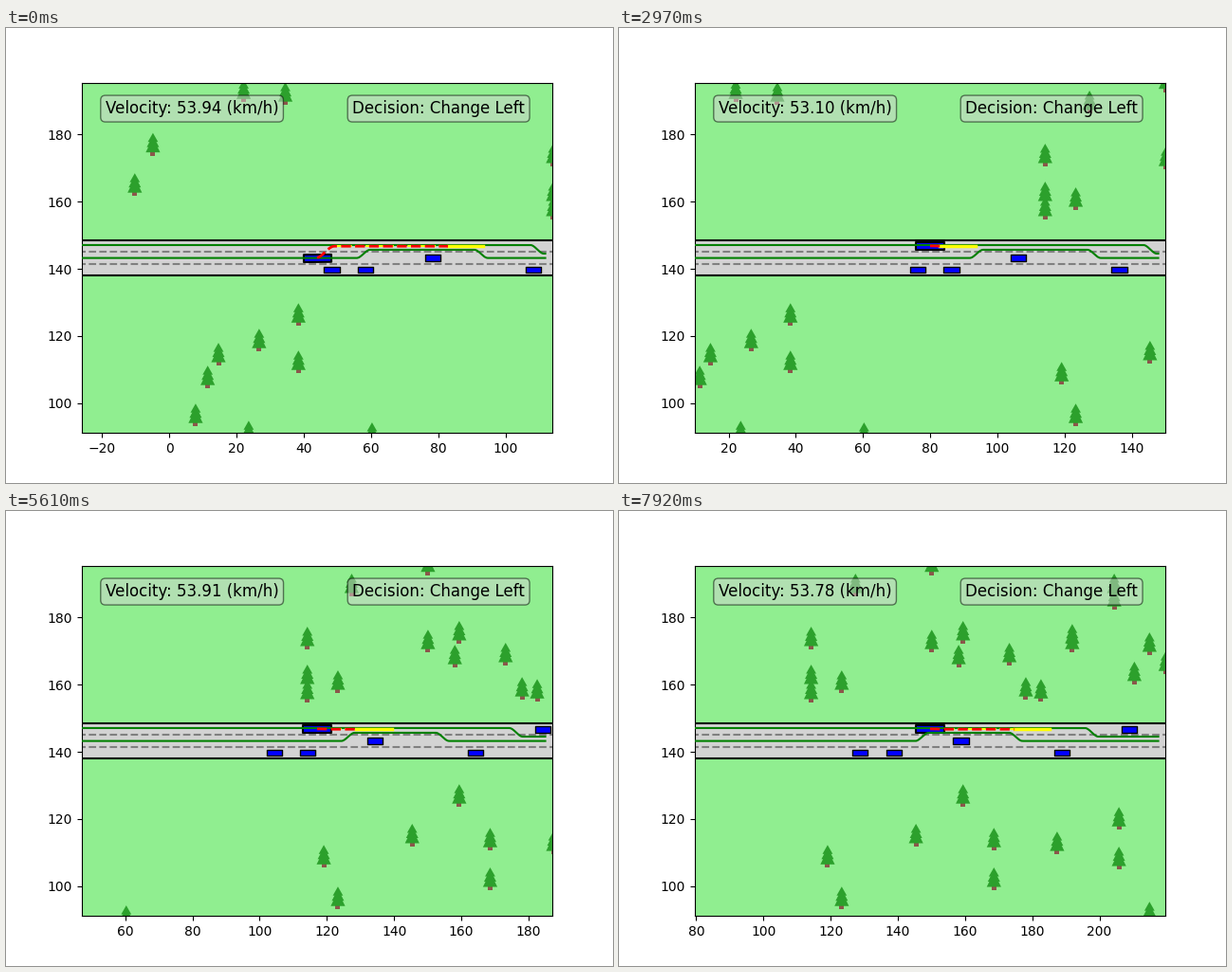
A matplotlib script for the animation above (8000 ms loop, 640 px wide and 480 px high).

```python
import numpy as np
import matplotlib.pyplot as plt
from matplotlib.animation import FuncAnimation
from matplotlib.collections import PolyCollection

TICK, LOOP, STEP_MS = 40, 8000, 330
LAST_STEP = LOOP // STEP_MS
SPAN = 140
BOTTOM = 91.15
TOP = BOTTOM + SPAN * 369.6 / 496
PX = SPAN / 496  # metres per pixel

LANE, CURB = 3.5, 138
RIGHT, MIDDLE, LEFT = (CURB + LANE * (n + 0.5) for n in range(3))

EGO_SPEED, CAR_SPEED = 4.643, 3.5  # metres per step
CARS = [(0, RIGHT), (10, RIGHT), (30, MIDDLE), (60, RIGHT), (80, LEFT)]
PLAN_STEPS, PLAN_LENGTH = 10, 45.9

# Reading on the speed label, as (step, km/h)
SPEED_KEYS = [(1, 53.94), (4, 50.49), (7, 52.90), (12, 53.40),
              (15, 53.76), (19, 54.07), (24, 53.78)]

# Per plan: where the lower guide rises and falls, where the upper one drops
GUIDES = [(83.8, 118.8, 135.5), (79.2, 107.3, 129.2), (67.6, 95.5, 118.1)]

# Trees by column: x, then the heights at which they stand
TREES = {
    -10.3: [165.1], -4.9: [177.1], 7.8: [96.5], 11.4: [107.8],
    14.6: [114.6], 22.1: [193], 23.6: [91.4], 26.7: [118.8], 34.5: [192.2],
    38.4: [126.4, 112.3], 60.3: [90.9], 114.2: [173.9, 162.6, 158.1],
    119.1: [108.9], 123.3: [160.9, 96.5], 127.4: [189.7], 145.4: [115.2],
    150.1: [196, 173], 158.1: [168.5], 159.4: [175.6, 127],
    168.6: [114, 102.2], 173.2: [169.1], 178.1: [158.9], 182.6: [158.3],
    187.4: [112.9], 191.9: [174.7, 173], 204.4: [189.7, 185.7],
    205.8: [120.2, 108.4], 210.4: [163.5], 214.9: [172.2, 92],
    219.7: [166.5],
}


def smooth(u):
    u = np.clip(u, 0, 1)
    return u * u * (3 - 2 * u)


def ramp(x, mid, width=4):
    return smooth((x - mid) / width + 0.5)


def box(x, y, length, width, tilt=0):
    a = np.radians(tilt)
    turn = np.array([(np.cos(a), np.sin(a)), (-np.sin(a), np.cos(a))])
    corners = np.array([(-1, -1), (1, -1), (1, 1), (-1, 1)]) / 2
    return corners * (length, width) @ turn + (x, y)


def crown(x, y):
    """Three stacked triangles, each wider and lower than the last."""
    for n in range(3):
        half, base, top = 5.4 + 1.1 * n, 2.5 - 5.5 * n, 12 - 2.5 * n
        tri = np.array([(-half, base), (half, base), (0, top)])
        yield tri * PX + (x, y)


fig, ax = plt.subplots(figsize=(6.4, 4.8), dpi=100)
ax.set_facecolor("lightgreen")
ax.set_ylim(BOTTOM, TOP)

ROAD = [-200, 400]
ax.fill_between(ROAD, CURB, CURB + 3 * LANE, color="lightgray", lw=0, zorder=1)
for n in range(4):
    edge = n in (0, 3)
    ax.plot(ROAD, [CURB + n * LANE] * 2, color="black" if edge else "gray",
            ls="-" if edge else "--", lw=1.5, zorder=2)

spots = [(x, y) for x, ys in TREES.items() for y in ys]
trunks = [box(x, y - 9 * PX, 5 * PX, 6 * PX) for x, y in spots]
crowns = [tri for spot in spots for tri in crown(*spot)]
for shapes, color in ((trunks, "tab:brown"), (crowns, "tab:green")):
    ax.add_collection(PolyCollection(shapes, facecolor=color, lw=0, zorder=2))


def vehicles(lw):
    shapes = PolyCollection([], facecolor="blue", edgecolor="black", lw=lw,
                            zorder=3)
    return ax.add_collection(shapes)


def line(color, lw, ls="-", z=4):
    return ax.plot([], [], color=color, lw=lw, ls=ls, zorder=z)[0]


def label(x, text):
    style = dict(boxstyle="round", facecolor="lightgray", alpha=0.5)
    return ax.text(x, 0.95, text, transform=ax.transAxes, fontsize=12,
                   va="top", bbox=style, zorder=6)


cars, ego = vehicles(1), vehicles(1.5)
upper, lower = line("green", 1.5), line("green", 1.5)
under, far = line("yellow", 1.5, "--", 5), line("yellow", 2.5, z=5)
near = line("red", 2, "--", 5)
speed_label = label(0.05, "")
label(0.575, "Decision: Change Left")


def view_left(k):
    # Braking at the start fades out by step 7
    lag = 1.52 * (1 - 0.5 ** (max(0, 7 - k) / 3))
    return 0.67 + EGO_SPEED * (k - 7) + lag


def draw(i):
    k = max(1, min((i * TICK + TICK - 1) // STEP_MS, LAST_STEP))
    x0 = view_left(k)
    ax.set_xlim(x0, x0 + SPAN)
    speed_label.set_text(f"Velocity: {np.interp(k, *zip(*SPEED_KEYS)):.2f} (km/h)")

    shift = np.clip((k - 0.5) / 8, 0, 1)
    ex = x0 + SPAN / 2
    ey = MIDDLE + 3.6 * smooth(shift)
    tilt = 10 * (4 * shift * (1 - shift)) ** 2
    ego.set_verts([box(ex, ey, 8.2, 2.2, tilt)])
    lead = 48.3 + CAR_SPEED * (k - 1)
    cars.set_verts([box(lead + dx, y, 4.6, 1.9) for dx, y in CARS])

    plan = (k - 1) // PLAN_STEPS
    rise, fall, drop = GUIDES[plan]
    s = np.linspace(-2, 137.9, 500)
    upper.set_data(x0 + s, 147.1 - 2.55 * ramp(s, drop))
    lower.set_data(x0 + s, 143.25 + 2.45 * (ramp(s, rise) - ramp(s, fall)))

    end = 93.4 + PLAN_LENGTH * plan
    split = max(end - 10.5, ex)
    xs = np.linspace(ex, split, 80)
    near.set_data(xs, ey + (LEFT - ey) * ramp(xs, ex + 2.4, 5.4))
    under.set_data([min(ex + 5, split), split], [LEFT, LEFT])
    far.set_data([split, max(split, end)], [LEFT, LEFT])
    return ()


anim = FuncAnimation(fig, draw, frames=LOOP // TICK, interval=TICK,
                     init_func=lambda: draw(0), repeat=True, repeat_delay=0)
plt.show()
```
